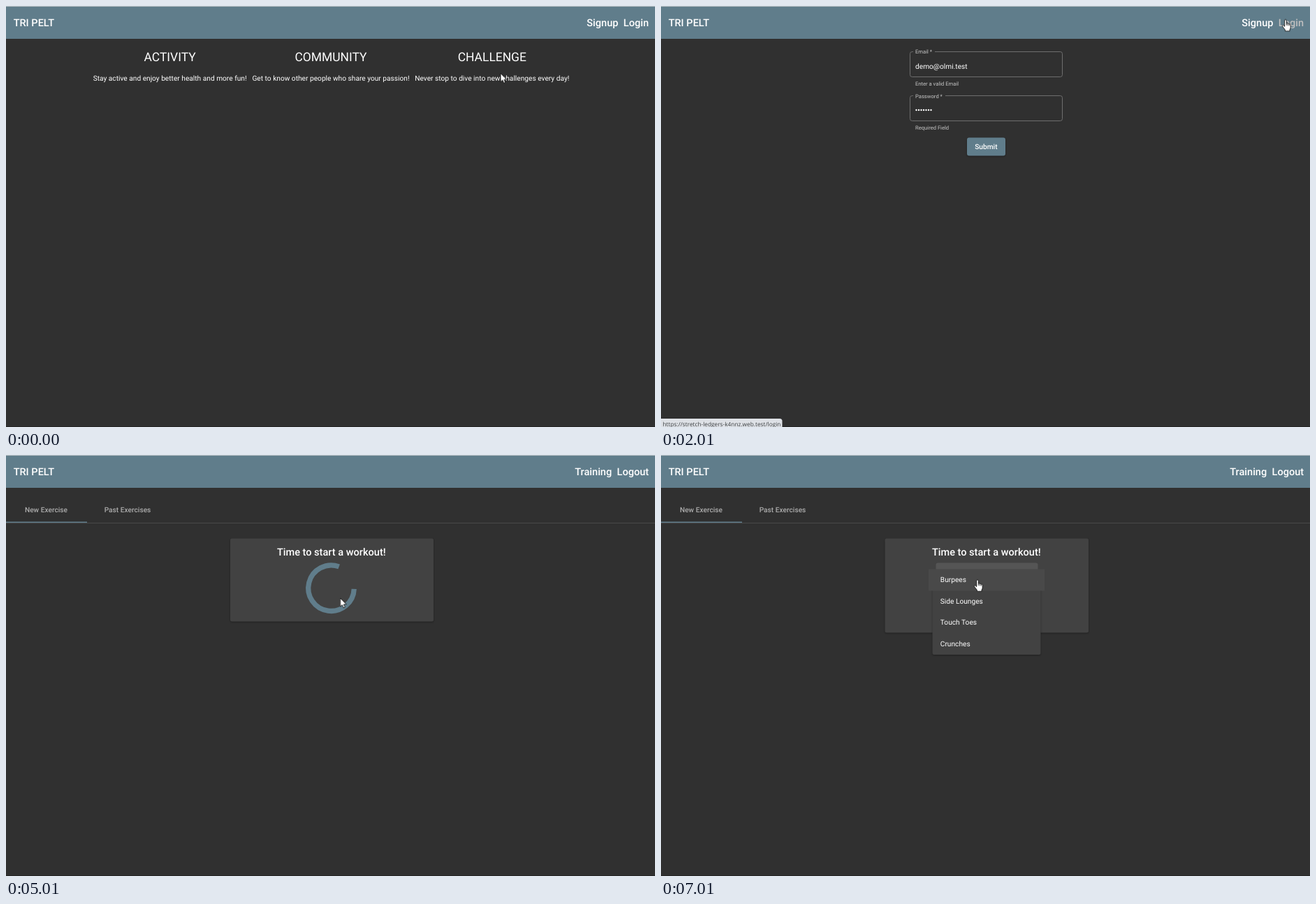
Recreate the animation shown at these times as an HTML page. Size 929 by 603 pixels, loop 8 s.

```html
<!DOCTYPE html>
<html lang="en">
<head>
<meta charset="utf-8">
<title>Workout app walkthrough</title>
<style>
  html, body { margin: 0; width: 100%; height: 100%; overflow: hidden; background: #303030; }
  svg { display: block; width: 929px; height: 603px; }
  text { font-family: Roboto, sans-serif; font-size: 10.19px; fill: #fff; text-rendering: geometricPrecision; white-space: pre; }
  .bar { font-size: 14.55px; font-weight: 500; }
  .head { font-size: 17.46px; }
  .bold { font-weight: 500; }
  .small { font-size: 7.64px; fill: #c6c6c6; }
  .tab { font-weight: 500; fill: #acacac; }
  .mid { text-anchor: middle; }
  .outline { fill: none; stroke: #6e6e6e; }
  .ring { fill: none; stroke: #607d8b; stroke-width: 7.28; }
  .status { font: 8.3px "Open Sans", sans-serif; fill: #3c4043; }
  .pointer { fill: #fff; stroke: #000; stroke-width: .8; stroke-linejoin: round; }
  .lift { filter: drop-shadow(0 1px 1px rgba(0, 0, 0, .35)); }
  [data-scenes], .pointer { opacity: 0; }
</style>
</head>
<body>
<svg viewBox="0 0 929 603">
  <rect width="929" height="603" fill="#303030"/>
  <rect y="602" width="929" height="1" fill="#262626"/>
  <rect width="929" height="47" fill="#607d8b"/>
  <rect width="929" height="1" fill="#b4bec3"/>
  <text class="bar" x="10.7" y="29.2">TRI PELT</text>

  <g data-scenes="0 1 2 3 4"><text class="bar" x="831.3" y="29.2">Signup</text></g>
  <g data-scenes="0 3 4"><text class="bar" x="883.8" y="29.2">Login</text></g>
  <g data-scenes="1 2"><text class="bar" x="883.8" y="29.2" style="fill:#c0c0c0">Login</text></g>

  <g data-scenes="0 1" class="mid">
    <text class="head" x="234.6" y="79.4">ACTIVITY</text>
    <text class="head" x="465" y="79.4">COMMUNITY</text>
    <text class="head" x="695.8" y="79.4">CHALLENGE</text>
    <text x="234.6" y="107">Stay active and enjoy better health and more fun!</text>
    <text x="465" y="107">Get to know other people who share your passion!</text>
    <text x="695.8" y="107">Never stop to dive into new challenges every day!</text>
  </g>

  <g data-scenes="2 3 4">
    <rect class="outline" x="356.5" y="65.5" width="218" height="36" rx="3"/>
    <rect x="361" y="64" width="31" height="3" fill="#303030"/>
    <text class="small" x="364" y="68.2">Email *</text>
    <text x="364" y="89.5">demo@olmi.test</text>
    <text class="small" x="364" y="113.6">Enter a valid Email</text>
    <rect class="outline" x="356.5" y="128.5" width="218" height="36" rx="3"/>
    <rect x="361" y="127" width="46" height="3" fill="#303030"/>
    <text class="small" x="364" y="131.6">Password *</text>
    <path d="M365.5 149H386.6" stroke="#fff" stroke-width="2.4" stroke-linecap="round" stroke-dasharray="0 3.5"/>
    <text class="small" x="364" y="176.8">Required Field</text>
  </g>
  <g data-scenes="2 3">
    <rect class="lift" x="438" y="188.5" width="55" height="26" rx="3" fill="#607d8b"/>
    <text class="bold mid" x="465.4" y="204.8">Submit</text>
  </g>
  <g data-scenes="2">
    <path d="M0 591H170Q173.500 591 173.500 594.500V603H0Z" fill="#dee1e6"/>
    <text class="status" x="2.5" y="602">https://stretch-ledgers-k4nnz.web.test/login</text>
  </g>
  <g data-scenes="4"><path class="ring" data-arc="465.5 225 -42 -6"/></g>

  <g data-scenes="5 6 7">
    <text class="bar" x="814.2" y="29.2">Training</text>
    <text class="bar" x="874.5" y="29.2">Logout</text>
    <rect y="97" width="929" height="1" fill="#494949"/>
    <rect y="95.500" width="116" height="1.500" fill="#607d8b"/>
    <text class="tab mid" x="57.5" y="82.2">New Exercise</text>
    <text class="tab mid" x="174" y="82.2">Past Exercises</text>
  </g>
  <g data-scenes="5"><rect class="lift" x="321" y="119.5" width="291" height="119" rx="2.5" fill="#424242"/></g>
  <g data-scenes="6 7">
    <rect class="lift" x="320.5" y="119.5" width="291.500" height="135" rx="2.5" fill="#424242"/>
    <path d="M393.5 191.500V157.500Q393.500 154.500 396.500 154.500H536.500Q539.500 154.500 539.500 157.500V191.500Z" fill="#555"/>
  </g>
  <g data-scenes="5 6 7"><text class="bar mid" x="465.8" y="143.6">Time to start a workout!</text></g>
  <g data-scenes="5"><path class="ring" data-arc="465.5 190.7 2 290"/></g>
  <g data-scenes="6">
    <rect x="393.5" y="190.800" width="146" height="1" fill="#c6c6c6"/>
    <text x="399.8" y="177" style="fill:#c6c6c6">Choose Exercise *</text>
    <path d="M520.8 171.600h7.400l-3.700 3.700z" fill="#c6c6c6"/>
    <rect class="outline" x="438.5" y="223.500" width="54" height="25" rx="2.5"/>
    <text class="bold mid" x="465.5" y="239.300" style="fill:#7b7b7b">START</text>
  </g>
  <g data-scenes="7">
    <rect class="lift" x="388.5" y="164" width="155" height="122" rx="2.5" fill="#424242"/>
    <rect x="383" y="163.500" width="166" height="31" fill="#494949"/>
    <text x="399.8" y="182">Burpees</text>
    <text x="399.8" y="212.600">Side Lounges</text>
    <text x="399.8" y="243.100">Touch Toes</text>
    <text x="399.8" y="273.700">Crunches</text>
  </g>

  <path class="pointer" id="arrow" d="M0 0V12.300L2.800 9.700L4.700 13.900L6.700 13L4.900 8.900H8.700Z"/>
  <path class="pointer" id="hand" d="M-1.300 10V1.100Q-1.300 0 0 0T1.300 1.100V5.200Q2.300 4.500 3.300 5.600Q4.500 5 5.300 6.200Q7.200 5.800 7.200 7.600V11Q7.200 13 6 14.500V16.400H-.6V14.700L-4.500 9.600Q-5 8.200-3.600 8Q-2.500 8-1.300 10ZM1.300 5.200V8.200M3.300 5.600V8.500M5.300 6.200V8.700"/>
</svg>
<script>
  const LOOP = 8000;
  const starts = [0, 1000, 2010, 3020, 4010, 5010, 6010, 7010];
  const pointers = [
    ['arrow', 708, 96.500], ['hand', 894, 19.500], ['hand', 894, 19.500], ['hand', 478.500, 205],
    ['arrow', 478.500, 205], ['arrow', 478.500, 205], ['arrow', 391.500, 187.500], ['hand', 453, 178.800]
  ];

  // Holds the style of each scene until the next one begins.
  function play(el, styleOf) {
    const steps = starts.map((ms, i) => ({ offset: ms / LOOP, easing: 'step-end', ...styleOf(i) }));
    steps.push({ offset: 1, ...styleOf(starts.length - 1) });
    el.animate(steps, { duration: LOOP, iterations: Infinity });
  }

  function arcPath(cx, cy, from, to, r = 32.74) {
    const point = deg => {
      const a = deg * Math.PI / 180;
      return `${cx + r * Math.cos(a)} ${cy + r * Math.sin(a)}`;
    };
    return `M${point(from)}A${r} ${r} 0 ${to - from > 180 ? 1 : 0} 1 ${point(to)}`;
  }

  document.querySelectorAll('[data-arc]').forEach(el =>
    el.setAttribute('d', arcPath(...el.dataset.arc.split(' ').map(Number))));

  document.querySelectorAll('[data-scenes]').forEach(el => {
    const scenes = el.dataset.scenes.split(' ').map(Number);
    play(el, i => ({ opacity: scenes.includes(i) ? 1 : 0 }));
  });

  document.querySelectorAll('.pointer').forEach(el => play(el, i => {
    const [kind, x, y] = pointers[i];
    return { opacity: kind === el.id ? 1 : 0, transform: `translate(${x}px, ${y}px)` };
  }));
</script>
</body>
</html>
```
